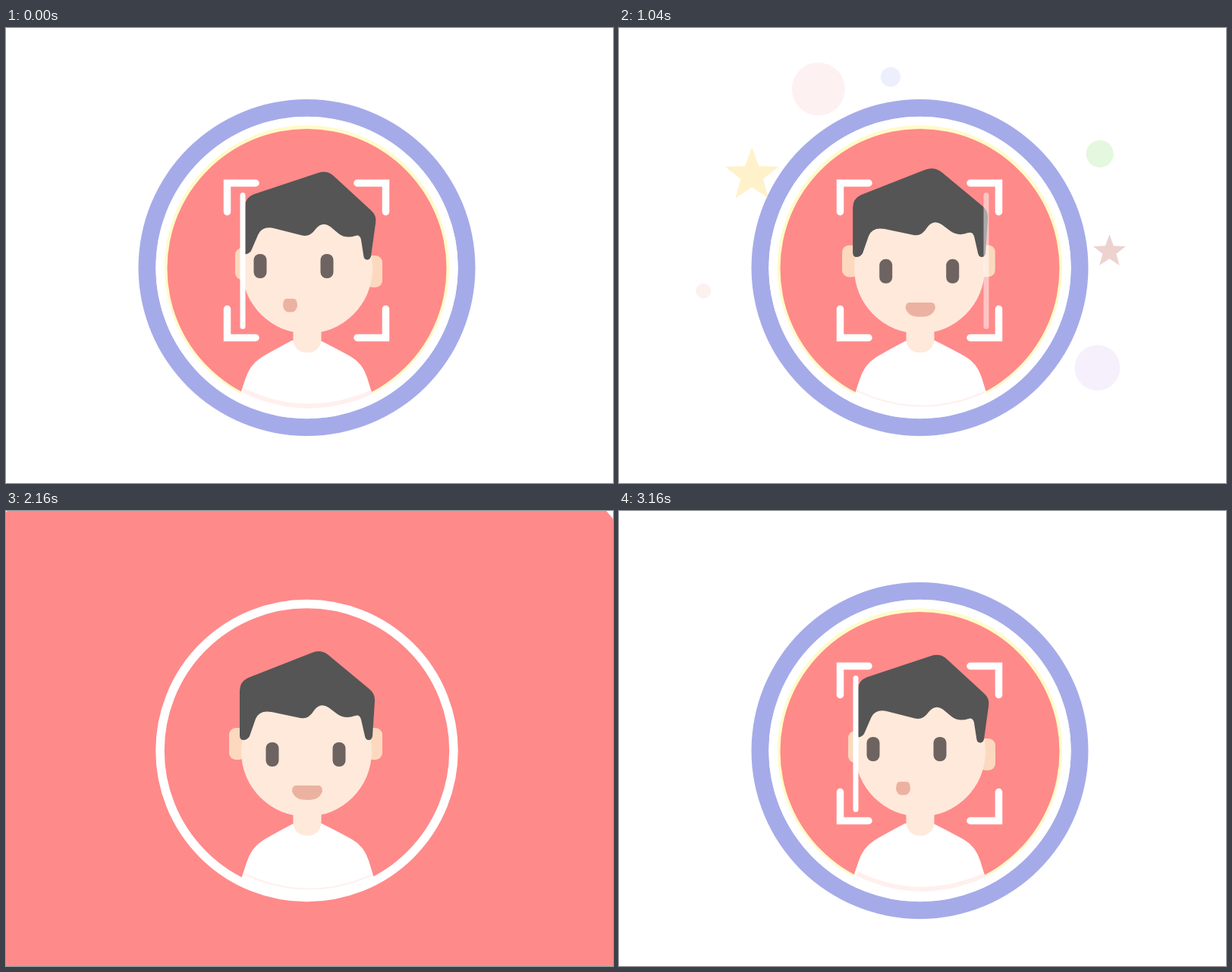
An HTML page with a canvas that plays this animation: 800x600 px, repeating every 3.2 s.

```html
<!DOCTYPE html>
<html lang="en">
<head>
<meta charset="utf-8">
<title>Face scan</title>
<style>
  html, body { margin: 0; width: 100%; height: 100%; overflow: hidden; background: #fff; }
  canvas { display: block; }
</style>
</head>
<body>
<canvas id="stage" width="800" height="600"></canvas>
<script>
const ctx = document.getElementById('stage').getContext('2d');
const LOOP = 3200, CX = 396.5, CY = 316, FULL = 505;
const RED = '#ff8a8a', BLUE = '#a5abe9', YELLOW = '#fffbc8', SKIN = '#ffe9db', EAR = '#fcd9be';
// Phases: scan until OPEN, circles fill the stage, shrink from CLOSE, settle into the first pose.
const OPEN = 1160, CLOSE = 2120, SETTLE = 2700, READY = 3120;

const linear = u => u;
const cubic = u => u < .5 ? 4 * u ** 3 : 1 - 4 * (1 - u) ** 3;
const backOut = u => 1 + 3.85 * (u - 1) ** 3 + 2.85 * (u - 1) ** 2;
const mix = (a, b, u) => a + (b - a) * u;
// Eased progress from 0 at start to 1 at end.
const ramp = (t, start, end, ease = cubic) =>
  ease(Math.max(0, Math.min(1, (t - start) / (end - start))));

const hair = new Path2D(`M308 296V237Q308 225 319 220L403 187Q415 182 425 190L478 234
  Q487 241 486 251L483 297Q482 302 478 302Q474 302 473 297L468 275Q466 268 460 270
  Q447 275 437 268L425 259Q414 252 406 263Q399 275 388 273L350 265Q334 262 329 274L321 297
  Q318 302 313 302Q308 302 308 296Z`);
const shirt = new Path2D(`M305 500L317 464Q323 444 339 434Q356 424 379 412H416Q438 423 456 433
  Q472 442 478 461L490 500Q397 540 305 500Z`);

// x, y, radius, colour, shape
const particles = [
  [270, 93, 35, '#fad4d4', disc],
  [360, 78, 13, '#c8cef5', disc],
  [621, 174, 18, '#aee59e', disc],
  [633, 296, 22.5, '#c97771', star],
  [618, 441, 30, '#e4d1f4', disc],
  [126.5, 345, 10, '#f9d5ca', disc],
  [187, 201, 37, '#ffd45f', star],
];

function disc(x, y, r, color) {
  ctx.fillStyle = color;
  ctx.beginPath();
  ctx.arc(x, y, r, 0, 7);
  ctx.fill();
}

function star(x, y, r, color) {
  ctx.fillStyle = color;
  ctx.beginPath();
  for (let i = 0; i < 10; i++) {
    const a = i * Math.PI / 5, d = i % 2 ? r * .42 : r;
    ctx.lineTo(x + d * Math.sin(a), y - d * Math.cos(a));
  }
  ctx.fill();
}

function pill(x, y, w, h, r, color) {
  ctx.fillStyle = color;
  ctx.beginPath();
  ctx.roundRect(x, y, w, h, r);
  ctx.fill();
}

// Grows from rest to FULL, swells, shrinks to low, springs back to rest; sinks a little when large.
function layer(t, rest, low, openAt, closeAt, color, cy = CY) {
  const full = FULL + 21 * ramp(t, closeAt, closeAt + 80);
  const r = t < CLOSE
    ? mix(rest, full, ramp(t, openAt, openAt + 280))
    : t < SETTLE
      ? mix(full, low, ramp(t, closeAt + 80, closeAt + 320))
      : mix(low, rest, ramp(t, SETTLE, READY, backOut));
  disc(CX, cy + .047 * Math.max(0, r - rest), r, color);
}

function drawRings(t) {
  const lag = 123;
  layer(t, 222, 0, OPEN + lag, CLOSE + 2 * lag, BLUE);
  disc(CX, CY, 199, '#fff');
  layer(t, 188, 188, OPEN - 30, CLOSE + lag, YELLOW);
  layer(t, 184, 164, OPEN + 85, CLOSE, RED, CY + 1);
  ctx.strokeStyle = '#fff';
  ctx.lineWidth = 11.5;
  ctx.beginPath();
  ctx.arc(CX, CY, 193.5, 0, 7);
  ctx.stroke();
}

function drawMouth(x, y, smile) {
  const w = mix(9.5, 20, smile), h = mix(17.5, 19, smile), side = mix(.55, .4, smile) * h, r = 5;
  ctx.save();
  ctx.translate(x, y);
  ctx.fillStyle = '#ecb2a1';
  ctx.beginPath();
  ctx.moveTo(-w + r, 0);
  ctx.lineTo(w - r, 0);
  ctx.quadraticCurveTo(w, 0, w, side);
  ctx.bezierCurveTo(w * .8, h, w * .35, h, 0, h);
  ctx.bezierCurveTo(-w * .35, h, -w * .8, h, -w, side);
  ctx.quadraticCurveTo(-w, 0, -w + r, 0);
  ctx.fill();
  ctx.restore();
}

function drawBody(left) {
  ctx.save();
  ctx.beginPath();
  ctx.arc(CX, CY, 190, 0, 7);
  ctx.clip();
  ctx.translate(-2 * left, 0);
  ctx.fillStyle = '#fff';
  ctx.fill(shirt);
  ctx.restore();
  ctx.strokeStyle = '#fff0ee';
  ctx.lineWidth = 2 + 4 * left;
  ctx.beginPath();
  ctx.moveTo(313, 478);
  ctx.quadraticCurveTo(397, 518, 482, 480);
  ctx.stroke();
}

function drawPerson(t) {
  const turn = 2 * ramp(t, 40, 600) - 1 - ramp(t, 760, 1120) - ramp(t, SETTLE, READY);
  const smile = ramp(t, 720, 1120) - ramp(t, SETTLE, READY);
  const left = Math.max(0, -turn), right = Math.max(0, turn);

  drawBody(left);
  pill(294 + 8 * left + 2 * right, 286 + 4 * left + 11 * right, 22, 42, 9, EAR);
  pill(474 - 6 * right, 286 + 14 * left + 4 * right, 22, 42, 9, EAR);
  pill(378.5, 385, 37, 43, 17, SKIN);
  disc(396 + left + right, 317, 86, SKIN);
  for (const x of [351, 439])
    pill(x - 8.5 + 16 * turn + right, 305 - 7 * left - 3 * right, 17, 32, 8, '#6d6360');
  drawMouth(397 - 22.5 * left + 6.5 * right, 362 - 5 * left - 2 * right, smile);

  ctx.save();
  ctx.translate(396 + 3 * right, 300 + 2 * right);
  ctx.transform(1 - .025 * left, .045 * left, -.07 * left, 1 - .035 * left, 0, 0);
  ctx.translate(-396, -300);
  ctx.fillStyle = '#555';
  ctx.fill(hair);
  ctx.restore();
}

function drawBrackets(t) {
  const leave = ramp(t, 1200, 1420, linear), enter = ramp(t, 2660, 2960, linear);
  const scale = t < CLOSE ? 1 + .486 * leave : .9 + .1 * enter;
  ctx.save();
  ctx.globalAlpha = 1 - leave + enter;
  ctx.translate(396, 306.5);
  ctx.scale(scale, scale);
  ctx.strokeStyle = '#fff';
  ctx.lineWidth = 9.5;
  ctx.lineCap = 'round';
  ctx.beginPath();
  for (const sx of [-1, 1]) for (const sy of [-1, 1]) {
    ctx.moveTo(sx * 104.5, sy * 64);
    ctx.lineTo(sx * 104.5, sy * 102);
    ctx.lineTo(sx * 67, sy * 102);
  }
  ctx.stroke();
  ctx.restore();
}

function drawScan(t) {
  const scanX = delay => t < CLOSE ? mix(312, 484, ramp(t, delay, delay + 600)) : 312;
  const bar = scanX(0), tail = scanX(360);
  ctx.fillStyle = 'rgba(155,165,250,.5)';
  ctx.fillRect(tail, 219, bar - tail, 175);
  ctx.globalAlpha = 1 - ramp(t, 960, 1120, linear) + ramp(t, 2840, READY, linear);
  pill(bar - 3.5, 217, 7, 180, 3.5, '#fff');
  ctx.globalAlpha = 1;
}

function drawParticles(t) {
  if (t < 350 || t > 1120) return;
  const burst = 1 - Math.exp((350 - t) / 150);
  const reach = mix(.72, 1.06, burst), size = Math.min(1, 2.1 * burst);
  ctx.globalAlpha = 1 - ramp(t, 880, 1120, linear);
  for (const [x, y, r, color, draw] of particles)
    draw(mix(CX, x, reach), mix(CY, y, reach), r * size, color);
  ctx.globalAlpha = 1;
}

function frame() {
  const t = performance.now() % LOOP;
  ctx.fillStyle = '#fff';
  ctx.fillRect(0, 0, 800, 600);
  drawRings(t);
  drawPerson(t);
  drawBrackets(t);
  drawScan(t);
  drawParticles(t);
  requestAnimationFrame(frame);
}
frame();
</script>
</body>
</html>
```
